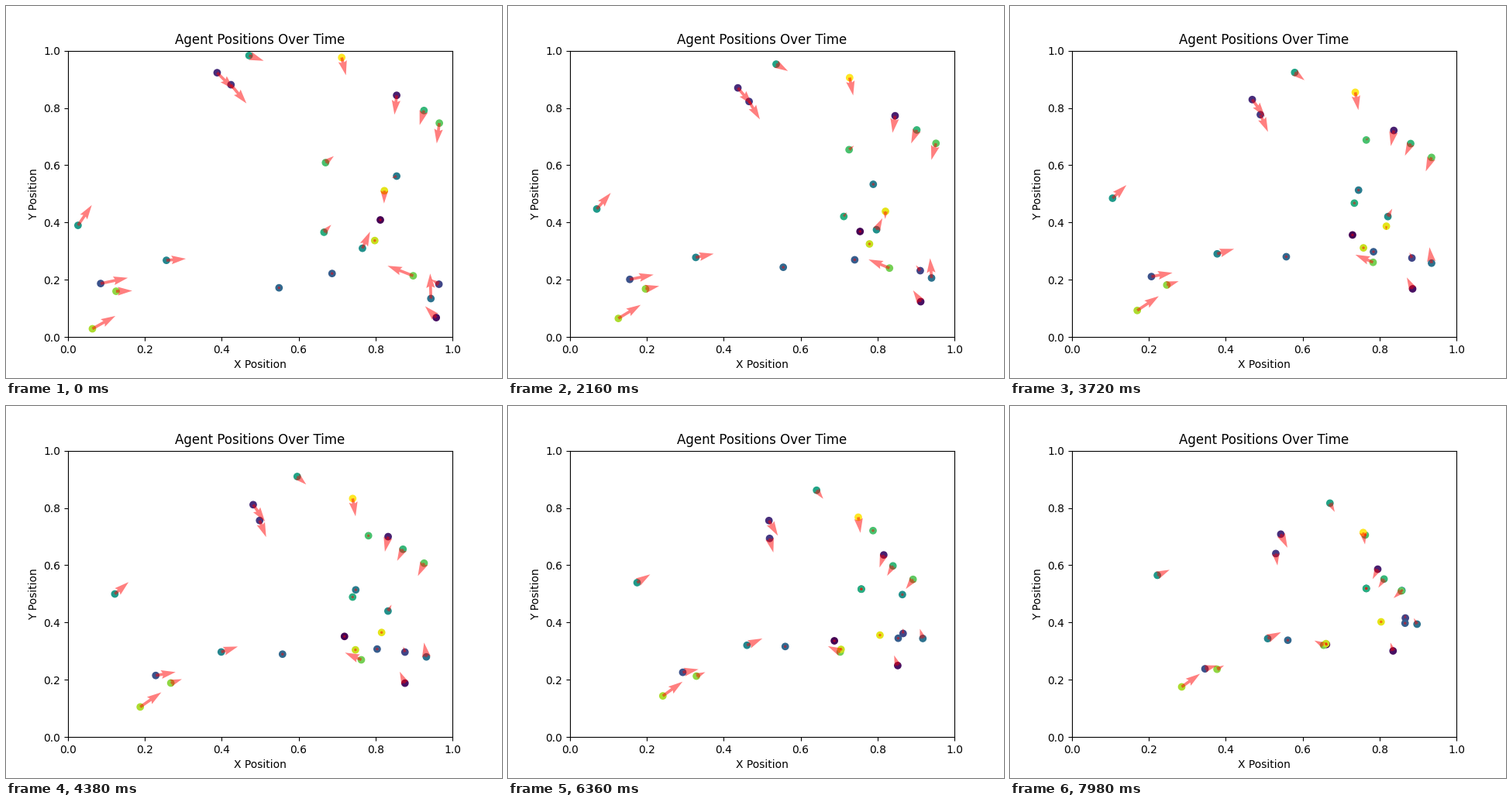
These frames come from a looping animation (640 by 480 pixels, 8 s). A matplotlib script:

```python
import numpy as np
import matplotlib.pyplot as plt
from matplotlib.animation import FuncAnimation

W, H = 640, 480
LAST = 133            # simulation steps in one loop
TICK, STEP = 20, 60   # ms per drawn frame, ms per simulation step
SPEED = 0.002         # longest move per step
GAIN = 49.2           # arrow pixels per unit of distance

# Start point and goal of each agent, in colour order. A string names the
# agents whose mean position is followed; a list is a slowly drifting goal.
AGENTS = {
    "k": (.8125, .409, [(.788, .385), (.661, .323)]),
    "t": (.958, .068, "m"),
    "e": (.855, .844, "l"),
    "a": (.388, .923, [(.826, .485), (.80, .37), (.717, .352)]),
    "b": (.424, .881, [(.83, .391), (.68, .32), (.574, .327)]),
    "r": (.965, .1845, "n"),
    "v": (.085, .187, "l"),
    "o": (.687, .222, [(.722, .262), (.79, .305), (.85, .325), (.867, .40)]),
    "p": (.549, .172, [(.554, .231), (.5615, .339)]),
    "s": (.944, .1345, "f"),
    "i": (.855, .562, [(.728, .508), (.766, .519)]),
    "x": (.256, .268, "n"),
    "n": (.766, .310, "g"),
    "u": (.026, .390, "a"),
    "c": (.471, .983, "e"),
    "m": (.666, .366, "i"),
    "f": (.926, .791, "k"),
    "h": (.670, .609, [(.887, .780), (.762, .705)]),
    "g": (.966, .747, "q"),
    "q": (.898, .214, "ay"),
    "w": (.125, .160, "p"),
    "y": (.0635, .029, "m"),
    "l": (.798, .337, [(.798, .337), (.774, .322), (.732, .294), (.659, .327)]),
    "j": (.823, .511, [(.815, .176), (.804, .404)]),
    "d": (.712, .976, "j"),
}
INDEX = {name: n for n, name in enumerate(AGENTS)}


def goal_of(rule, pos, k):
    if isinstance(rule, str):
        return pos[[INDEX[name] for name in rule]].mean(axis=0)
    times = np.linspace(0, LAST, len(rule))
    return [np.interp(k, times, axis) for axis in zip(*rule)]


def simulate():
    """Positions and gaps to the goal for every step."""
    pos = np.array([agent[:2] for agent in AGENTS.values()])
    rules = [agent[2] for agent in AGENTS.values()]
    track, gaps = [], []
    for k in range(LAST + 1):
        gap = np.array([goal_of(rule, pos, k) for rule in rules]) - pos
        track.append(pos)
        gaps.append(gap)
        dist = np.hypot(*gap.T)[:, None]
        pos = pos + gap * np.minimum(1, SPEED / np.maximum(dist, 1e-9))
    return np.array(track), np.array(gaps)


track, gaps = simulate()

fig, ax = plt.subplots(figsize=(W / 100, H / 100), dpi=100)
ax.set(xlim=(0, 1), ylim=(0, 1), xlabel="X Position", ylabel="Y Position",
       title="Agent Positions Over Time")
dots = ax.scatter(*track[0].T, c=np.arange(len(AGENTS)), cmap="viridis")
quiver = ax.quiver(*track[0].T, *gaps[0].T, color="red", alpha=0.5,
                   scale=1 / GAIN, scale_units="dots")


def update(i):
    k = min(i * TICK // STEP, LAST)
    dots.set_offsets(track[k])
    quiver.set_offsets(track[k])
    quiver.set_UVC(*gaps[k].T)
    return dots, quiver


anim = FuncAnimation(fig, update, frames=8000 // TICK, interval=TICK,
                     repeat=True, repeat_delay=0)
plt.show()
```
